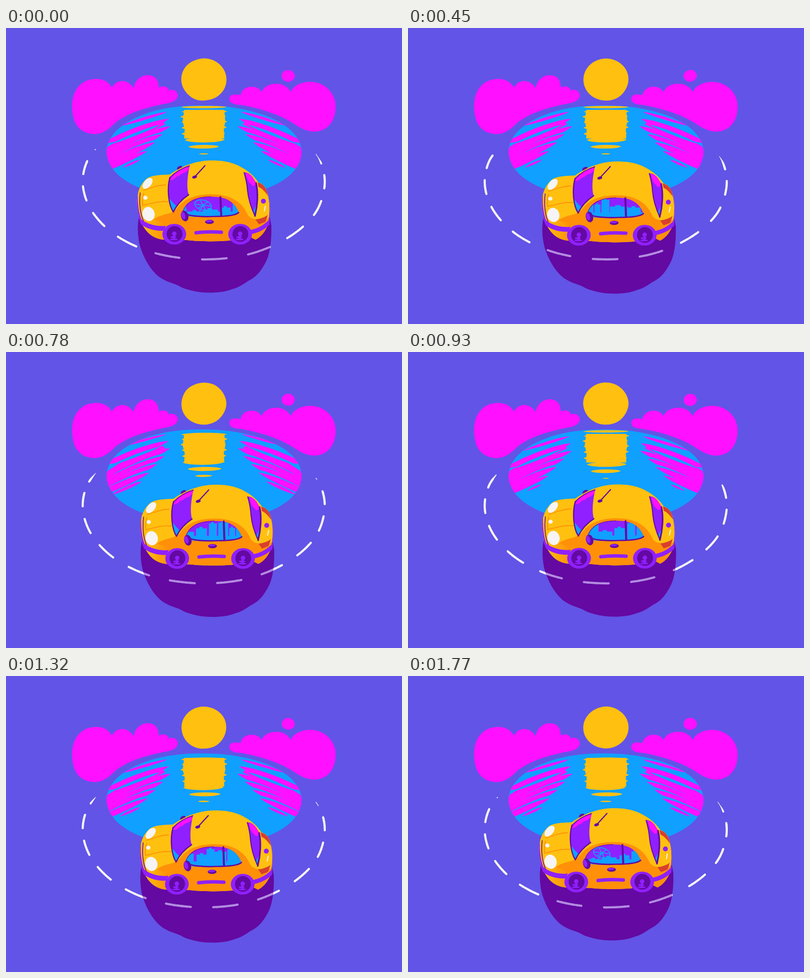
Animation of 800 by 600 pixels, one loop 1.8 s. Source, as an HTML page with a canvas:

```html
<!DOCTYPE html>
<html lang="en">
<head>
<meta charset="utf-8">
<title>Seaside drive</title>
<style>
html, body { margin: 0; width: 100%; height: 100%; overflow: hidden; background: #6254e6; }
canvas { display: block; width: 800px; height: 600px; }
</style>
</head>
<body>
<canvas id="stage" width="800" height="600"></canvas>
<script>
const ctx = document.getElementById('stage').getContext('2d');
const STEP = 30, FRAMES = 60, SPAN = FRAMES - 1;

const C = {
  sky: '#6254e6', sea: '#10a0ff', pink: '#ff10ff', yellow: '#ffc010', orange: '#ff9008',
  violet: '#9020ff', dark: '#6409a2', white: '#f6f4f4', lilac: '#b28ce0', red: '#d8402c'
};

const P = d => new Path2D(d);

const cloudL = P('M134 168C132 146 136 121 160 108C182 99 205 103 214 121C222 104 246 102 258 122C261 101 281 91 297 98C306 102 308 111 309 121C318 115 328 120 329 127C338 122 348 129 347 138C345 148 334 151 324 153C288 160 250 170 222 191C206 207 195 215 177 215C150 213 136 196 134 168Z');
const cloudR = P('M451 144C451 136 459 133 474 136C476 123 488 119 496 119C506 119 513 123 516 130C522 117 534 113 546 113C560 113 571 120 575 130C580 118 595 109 616 109C644 110 667 132 666 161C665 190 650 208 625 210C606 210 596 203 583 195C558 178 520 164 475 156C461 155 452 153 451 144Z');
const sea = P('M203 250C205 213 242 185 300 168C338 158 370 157 400 157C470 157 540 175 575 207C590 221 597 236 597 252C595 286 568 309 527 325L280 328C240 313 205 290 203 250Z');
const pinkCore = P('M198 266L205 241L230 225L270 206L316 190L322 195L290 211L262 229L236 249L212 268Z');
const sunCore = P('M360 166L441 166L443 190L440 204L441 224L360 224L361 205L357 190Z');
const shadow = P('M272 372C265 386 264 420 272 446C279 466 288 484 304 500C318 513 334 516 348 522C354 526 362 529 374 532C400 539 436 538 458 529C474 525 484 515 496 509C508 502 518 488 526 472C534 456 537 426 536 400L530 368Z');

const car = {
  body: P('M264.5 352C265 330 273 314 286 304C300 297 318 298 331 297C345 287 360 279 378 274C398 267 435 266 460 275C484 284 500 298 510 313C522 316 528 328 531 346C535 365 534 388 527 404C521 416 513 425 504 429L494 424L450 431C425 433 390 433 366 430L318 429C300 427 288 419 278 403C269 390 264.5 370 264.5 352Z'),
  side: P('M296 390C314 374 336 380 346 365C362 342 392 337 415 337C450 337 474 350 486 374C490 386 502 393 540 384L540 440L300 440Z'),
  nose: P('M258 382L300 388L330 400L330 440L258 440Z'),
  frontGlass: P('M331 303C343 291 358 283 371 279C367 298 364 322 369 338C357 346 345 358 338 373C328 358 325 326 331 303Z'),
  frontShine: P('M331 308C340 294 356 284 371 281L369 288C364 290 363 294 358 294C352 296 352 301 345 301C340 306 336 309 331 308Z'),
  frontSea: P('M329 344C334 350 339 357 345 361L338 373C332 366 329 354 329 344Z'),
  rearGlass: P('M481 293C490 291 499 301 505 314C510 334 508 360 503 381C496 366 490 350 488 330C487 315 484 303 481 293Z'),
  rearShine: P('M484 294C494 294 501 303 505 314C503 322 497 322 495 316C489 314 487 304 484 294Z'),
  rearSea: P('M508 350C508 362 506 372 503 381L499 372C503 365 506 358 508 350Z'),
  tail: P('M508 313C521 315 527 326 529 340C523 331 516 324 510 322Z'),
  patch: P('M504 388C513 387 522 384 529 379L524 393L511 398Z'),
  window: P('M357 372C363 353 380 342 414 342C444 341 462 352 470 374C468 380 440 382 420 382C396 384 373 383 363 380Z'),
  frontTrim: P('M267 383C282 397 302 403 323 401L318 411C300 412 283 406 273 398Z'),
  rearTrim: P('M492 410C510 406 522 399 533 387L532 399C522 409 508 416 494 418Z')
};

// Dash starts along the road, one per dash interval.
const road = [[197,228],[164,270],[155.5,321],[176,375],[226,423],[302,456.5],[396,469],
  [489,459],[568,426],[622,379],[643,325],[637,275],[607,230]];

// Scenery seen through the side windows: [x, width, top].
const town = [[-30,24,372],[-2,30,368],[34,20,364],[62,13,348],[58,22,356],[86,22,358],[106,16,347],
  [122,24,352],[148,24,347],[172,28,364],[204,22,357],[230,16,347],[249,20,345],[271,12,356],
  [285,16,346],[302,36,360],[338,26,362]];
const TOWN_W = 400;

// Car sway: [step, dx, dy].
const sway = [[0,0,0],[9,4,3],[21,6,1],[31,5.4,0],[44,5,4],[51,2.6,2],[59,0,-.5]];

function rand(n) {
  const s = Math.sin(n * 127.1 + 11.7) * 43758.5453;
  return s - Math.floor(s);
}

function keyed(table, n) {
  let i = 0;
  while (i < table.length - 2 && n > table[i + 1][0]) i++;
  const a = table[i], b = table[i + 1], k = (n - a[0]) / (b[0] - a[0]);
  return [1, 2].map(c => a[c] + (b[c] - a[c]) * k);
}

function roadAt(u) {
  const f = u + 1, i = Math.max(0, Math.min(road.length - 2, Math.floor(f))), t = f - i;
  const at = k => road[Math.max(0, Math.min(road.length - 1, k))];
  const [a, b, c, d] = [at(i - 1), at(i), at(i + 1), at(i + 2)];
  return [0, 1].map(k => b[k] + .5 * t * (c[k] - a[k] +
    t * (2 * a[k] - 5 * b[k] + 4 * c[k] - d[k] + t * (3 * (b[k] - c[k]) + d[k] - a[k]))));
}

function fill(path, color) {
  ctx.fillStyle = color;
  ctx.fill(path);
}

function oval(x, y, rx, ry, color, turn = 0) {
  ctx.beginPath();
  ctx.ellipse(x, y, rx, ry, turn, 0, 7);
  ctx.fillStyle = color;
  ctx.fill();
}

function line(d, color, width) {
  ctx.strokeStyle = color;
  ctx.lineWidth = width;
  ctx.stroke(P(d));
}

function clipped(path, draw) {
  ctx.save();
  ctx.clip(path);
  draw();
  ctx.restore();
}

// Hand-drawn round shape whose outline shifts a little with the seed.
function blob(x, y, rx, ry, rough, seed, color) {
  const n = 13, pts = [];
  for (let i = 0; i < n; i++) {
    const a = i / n * Math.PI * 2, r = 1 + (rand(seed * 31 + i) - .5) * rough;
    pts.push([x + Math.cos(a) * rx * r, y + Math.sin(a) * ry * r]);
  }
  const mid = i => [0, 1].map(k => (pts[i % n][k] + pts[(i + 1) % n][k]) / 2);
  ctx.beginPath();
  ctx.moveTo(...mid(0));
  for (let i = 1; i <= n; i++) ctx.quadraticCurveTo(...pts[i % n], ...mid(i));
  ctx.fillStyle = color;
  ctx.fill();
}

function spindle(x, y, length, slope, h) {
  const dx = -length, dy = length * slope;
  ctx.beginPath();
  ctx.moveTo(x, y);
  ctx.bezierCurveTo(x + dx * .2, y + dy * .1 - h, x + dx * .75, y + dy * .65 - h, x + dx, y + dy);
  ctx.bezierCurveTo(x + dx * .7, y + dy * .75 + h, x + dx * .15, y + dy * .2 + h, x, y);
  ctx.fill();
}

function sunRipples(phase) {
  fill(sunCore, C.yellow);
  for (let j = 0; j < 9; j++) {
    const v = j + phase;
    if (v > 8.24) continue;
    const k = Math.pow(1 - Math.pow(v / 8.25, 6), .8);
    const w = 46 * k, h = 5.5 * k * Math.min(1, .4 + v * .3);
    const y = 160 + 9 * v + .35 * v * v, x = 400 + Math.sin(j * 2.3) * 1.5;
    ctx.beginPath();
    ctx.moveTo(x - w, y);
    ctx.bezierCurveTo(x - w * .8, y - h * 1.35, x + w * .8, y - h * 1.35, x + w, y - h * .2);
    ctx.bezierCurveTo(x + w * .8, y + h * 1.35, x - w * .8, y + h * 1.35, x - w, y);
    ctx.fill();
  }
}

function cloudRipples(phase) {
  fill(pinkCore, C.pink);
  for (let j = 0; j < 8; j++) {
    const v = j + phase;
    if (v < .5 || v > 7.4) continue;
    const y = 156 + 13 * v + .4 * v * v;
    const x = v < 3 ? 322 + 3.5 * v : 333 - (v - 3) * 15.5;
    const length = v < 1.6 ? 95 : v < 6 ? 140 : 140 - (v - 6) * 100;
    const h = v < 1.6 ? 1.8 * v : v < 5 ? 5.4 : 5.4 - (v - 5) * 1.6;
    const slope = .45 - .3 * Math.pow(.5, v);
    ctx.fillStyle = C.pink;
    spindle(x, y, length, slope, h);
    if (v > 1.6 && v < 5) {
      spindle(x - 34, y + 15, length * .6, slope + .02, h * .5);
      ctx.fillStyle = C.sea;
      spindle(x - 18, y + 12, length * .7, slope + .02, 1.2);
    }
  }
}

function drawSea(n) {
  fill(sea, C.sea);
  const phase = (.05 + 4 * n / FRAMES) % 1;
  clipped(sea, () => {
    cloudRipples(phase);
    ctx.save();
    ctx.translate(800, 0);
    ctx.scale(-1, 1);
    cloudRipples(phase);
    ctx.restore();
    sunRipples(phase);
  });
}

function drawDashes(n, color) {
  const phase = 3 * n / SPAN % 1, first = -.5, last = 10.38;
  ctx.strokeStyle = color;
  for (let i = -1; i < 11; i++) {
    const a = Math.max(first, i + phase), b = Math.min(last, i + phase + .525);
    if (a >= b) continue;
    const parts = 6;
    for (let k = 0; k < parts; k++) {
      const u = a + (b - a) * k / parts, w = a + (b - a) * (k + 1) / parts;
      ctx.lineWidth = 4.3 * Math.max(.25, Math.min(1, (u - first) * 3 + .25, (last - w) * 2.6));
      ctx.beginPath();
      ctx.moveTo(...roadAt(u));
      ctx.lineTo(...roadAt((u + w) / 2));
      ctx.lineTo(...roadAt(w));
      ctx.stroke();
    }
  }
}

function drawTown(n) {
  const shift = TOWN_W * n / FRAMES;
  ctx.fillStyle = C.sea;
  ctx.fillRect(350, 372, 130, 15);
  for (const lap of [-TOWN_W, 0, TOWN_W]) {
    const left = shift + lap;
    ctx.fillStyle = C.sea;
    for (const [x, w, top] of town) {
      if (x + left > 480 || x + w + left < 350) continue;
      ctx.fillRect(x + left, top, w, 40);
      ctx.fillRect(x + left + w * .3, top - 3, w * .3, 5);
    }
    for (let x = 362; x < 440; x += 9) ctx.fillRect(x - 30 + left, 376 - rand(x) * 9, 6, 14);
    drawFerris(398 + left, 359);
  }
}

function drawFerris(x, y) {
  if (x < 320 || x > 510) return;
  ctx.strokeStyle = C.sea;
  ctx.lineWidth = 1.8;
  ctx.beginPath();
  ctx.ellipse(x, y, 17, 10, .25, 0, 7);
  for (let a = 0; a < 3; a++) {
    const c = Math.cos(a * 1.05 + .2) * 15, s = Math.sin(a * 1.05 + .2) * 9;
    ctx.moveTo(x - c, y - s);
    ctx.lineTo(x + c, y + s);
  }
  ctx.moveTo(x - 9, y + 16);
  ctx.lineTo(x, y);
  ctx.lineTo(x + 8, y + 16);
  ctx.stroke();
}

function drawWheel(x, y) {
  oval(x, y, 24, 21, C.violet);
  oval(x + .5, y - .5, 16, 16, C.dark);
  oval(x, y - 1, 4.5, 4.5, C.violet);
  oval(x - 2, y + 6, 6, 2, C.violet);
  oval(x - 1, y + 10.5, 8, 1.8, C.violet);
  ctx.fillStyle = C.violet;
  ctx.fillRect(x - 2, y + 1, 3.5, 9);
}

function drawGlass() {
  fill(car.frontGlass, C.violet);
  clipped(car.frontGlass, () => {
    fill(car.frontSea, C.sea);
    fill(car.frontShine, C.pink);
  });
  line('M331 303C325 326 328 358 338 373C345 358 357 346 369 338', C.dark, 2.4);
  line('M331 303C343 291 358 283 371 279', C.dark, 1.5);
  fill(car.rearGlass, C.violet);
  clipped(car.rearGlass, () => {
    fill(car.rearSea, C.sea);
    fill(car.rearShine, C.pink);
  });
  line('M481 293C484 303 487 315 488 330C490 350 496 366 503 381', C.dark, 2);
  line('M505 314C510 334 508 360 503 381', C.dark, 3.2);
}

function drawWindows(n) {
  fill(car.window, C.violet);
  clipped(car.window, () => drawTown(n));
  line('M358 374C367 382 400 383 420 382C444 382 464 380 470 374', C.dark, 2.6);
  line('M433 343C434 354 434 370 435 381', C.dark, 4);
  line('M358 370C365 353 382 342 414 342', C.dark, 1);
}

function drawCar(n) {
  oval(351, 284, 6, 4, C.dark, -.5);
  fill(car.body, C.yellow);
  clipped(car.body, () => {
    fill(car.side, C.orange);
    const blend = ctx.createLinearGradient(272, 0, 322, 0);
    blend.addColorStop(0, C.yellow);
    blend.addColorStop(1, C.orange);
    fill(car.nose, blend);
    fill(car.tail, C.red);
    fill(car.patch, C.red);
    line('M264 335C263 362 267 382 275 397', C.violet, 5);
    line('M271 334C269 354 271 376 278 392', C.dark, 1.6);
    line('M527 326C534 346 536 372 530 398', C.violet, 3);
  });
  line('M278 329C292 324 306 319 322 318', C.orange, 1.8);
  line('M278 335C276 343 275 351 276 360C292 356 304 351 327 352', C.orange, 1.8);
  drawGlass();
  drawWindows(n);
  fill(car.frontTrim, C.violet);
  fill(car.rearTrim, C.violet);

  oval(286, 315, 7.5, 13, C.white, .7);
  oval(288, 377, 12.3, 14.5, C.white, -.25);
  oval(281.5, 344, 4.5, 4, C.white);
  oval(520, 351, 5, 5, C.violet);
  line('M524 361L522 371', C.white, 2);

  oval(361, 381, 7.5, 11, C.dark, -.25);
  oval(358, 380, 4, 8, C.violet, -.3);
  oval(411, 393, 9, 4.2, C.dark);
  oval(410, 391.5, 7, 2, C.violet);
  ctx.lineCap = 'round';
  line('M384 415C400 413 420 413 435 414', C.violet, 7);
  line('M382 301L402 279', C.dark, 2.3);
  oval(381, 302, 5, 3, C.dark, -.3);
  drawWheel(340, 418);
  drawWheel(473, 418);
}

function draw(n) {
  ctx.setTransform(1, 0, 0, 1, 0, 0);
  ctx.fillStyle = C.sky;
  ctx.fillRect(0, 0, 800, 600);
  ctx.lineCap = ctx.lineJoin = 'round';

  const seed = Math.floor(n / 3);
  fill(cloudL, C.pink);
  fill(cloudR, C.pink);
  blob(570, 97, 13.8, 12.3, .1, seed + 50, C.pink);
  blob(399.7, 104.6, 46.8, 44, .03, seed, C.yellow);
  drawSea(n);
  drawDashes(n, C.white);

  const [dx, dy] = keyed(sway, n);
  ctx.save();
  ctx.translate(dx, dy);
  fill(shadow, C.dark);
  ctx.clip(shadow);
  ctx.translate(-dx, -dy);
  drawDashes(n, C.lilac);
  ctx.restore();

  const lean = dx * .0022;
  ctx.save();
  ctx.transform(1, 0, -lean, 1, dx + 430 * lean, dy);
  drawCar(n);
  ctx.restore();
}

const start = performance.now();
function tick() {
  const t = Math.max(0, performance.now() - start);
  draw(Math.floor(t / STEP) % FRAMES);
  requestAnimationFrame(tick);
}
tick();
</script>
</body>
</html>
```
